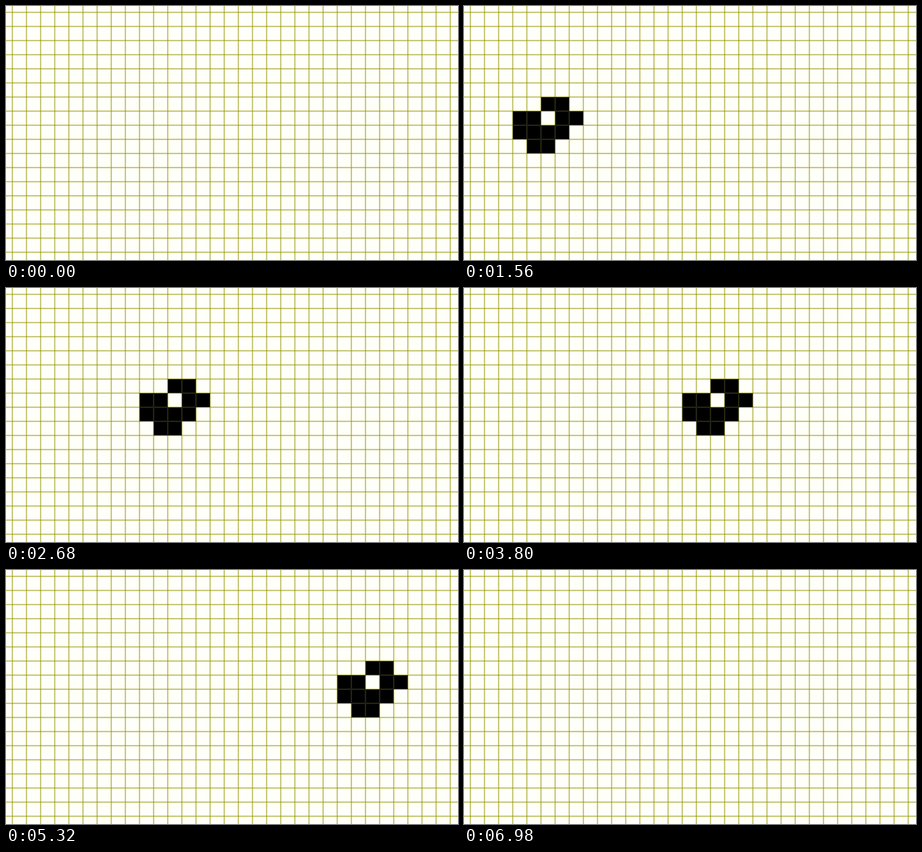
Animation, 640 px wide and 360 px high, one loop 7020 ms. Source, as an HTML page with a canvas:

```html
<!DOCTYPE html>
<html lang="en">
<head>
<meta charset="utf-8">
<title>Lightweight spaceship</title>
<style>
  html, body { margin: 0; width: 100%; height: 100%; overflow: hidden; background: #fffffa; }
  canvas { display: block; }
</style>
</head>
<body>
<canvas id="stage" width="640" height="360"></canvas>
<script>
const ctx = document.getElementById('stage').getContext('2d');
const LOOP = 7020, CELL = 20, ORIGIN = 9, AXIS = 7;

// The two basic poses; the other two are their mirror images about row AXIS.
const POSES = [
  { top: 5, rows: ['x..x.', '....x', 'x...x', '.xxxx'] },
  { top: 6, rows: ['..xx.', 'xx.xx', 'xxxx.', '.xx..'] }
];

// Three generations pass every 280 ms, unevenly spaced.
function generationAt(t) {
  const r = t % 280;
  return 3 * Math.floor(t / 280) + [20, 140, 260].filter(s => r >= s).length;
}

function drawGrid() {
  ctx.fillStyle = '#fffffa';
  ctx.fillRect(0, 0, 640, 360);
  ctx.fillStyle = 'rgba(150, 150, 0, 0.5)';
  for (let p = ORIGIN - 1; p < 640; p += CELL) {
    ctx.fillRect(p, 0, 2, 360);
    ctx.fillRect(0, p, 640, 2);
  }
}

// The rim stays slightly translucent so grid lines show between cells.
function drawCell(col, row) {
  const x = ORIGIN + col * CELL, y = ORIGIN + row * CELL;
  ctx.fillStyle = 'rgba(0, 0, 0, 0.82)';
  ctx.fillRect(x, y, CELL, CELL);
  ctx.fillStyle = '#000';
  ctx.fillRect(x + 1, y + 1, CELL - 2, CELL - 2);
}

function drawShip(gen) {
  const { top, rows } = POSES[gen % 2];
  const left = Math.ceil(gen / 2) - 6;
  const mirrored = gen % 4 > 1;
  rows.forEach((line, j) => {
    const row = mirrored ? 2 * AXIS - top - j : top + j;
    [...line].forEach((c, i) => {
      if (c === 'x') drawCell(left + i, row);
    });
  });
}

const start = performance.now();
function frame() {
  drawGrid();
  drawShip(generationAt((performance.now() - start) % LOOP));
  requestAnimationFrame(frame);
}
frame();
</script>
</body>
</html>
```
